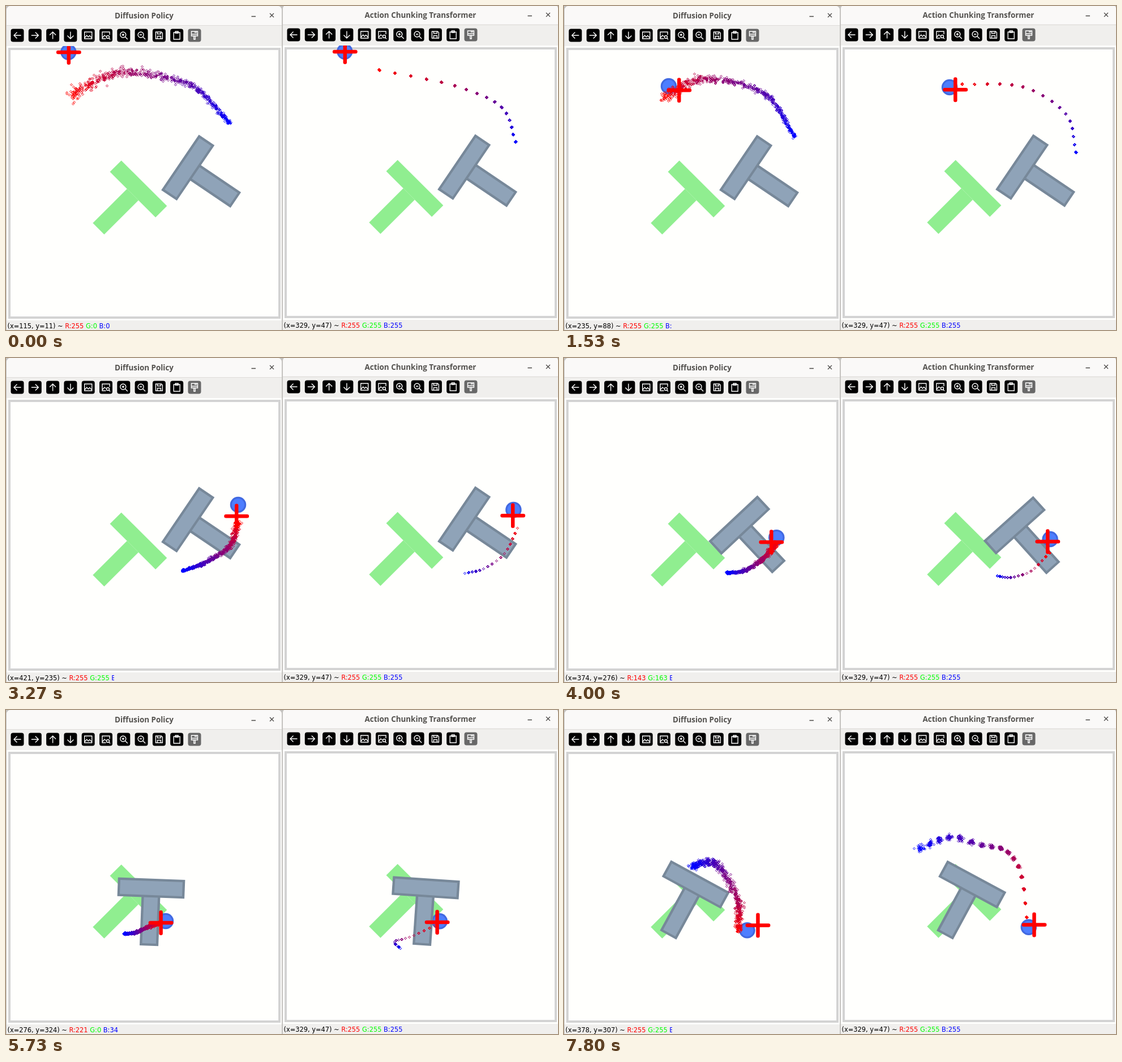
Animation of 975 by 574 pixels, one loop 8 s. Source, as an HTML page with a canvas:

```html
<!DOCTYPE html>
<html lang="en">
<head>
<meta charset="utf-8">
<title>Policy rollouts</title>
<style>
html, body { margin: 0; width: 100%; height: 100%; overflow: hidden; background: #fff; }
canvas { display: block; }
</style>
</head>
<body>
<canvas id="stage" width="975" height="574"></canvas>
<script>
const ctx = document.getElementById('stage').getContext('2d');
const LOOP = 8000, STEP_COUNT = 46, SAMPLES = 40, DOTS = 16;
const SCALE = 0.95, OX = 1, OY = 71;
const LEAD = 150, HOME_TIME = 6600;

// The picture is refreshed every 2.6 ticks of a 15 Hz clock, in whole ticks.
const stepTime = i => Math.round(Math.floor(2.6005 * i + 0.39) * 100 / 15) * 10;

// Cross: time, x, y. The pointer readout runs ahead of it, the agents trail it.
const PATH = [
  [150, 110.3, 81.6], [600, 122, 121], [1380, 185, 142], [1680, 224.3, 154.6], [2300, 318, 160],
  [2850, 414, 222], [3120, 410, 260], [3420, 401, 294.3], [4820, 315.5, 360.8], [5580, 282, 374],
  [5880, 263.2, 378.8], [6450, 227, 386], [6750, 222.4, 387.4], [7250, 275, 406], [7800, 342, 381],
  [7950, 360, 362.7]
];

// Points along each predicted curve, evenly spaced in plan time.
const PLANS = [
  { t: 0, left: [118, 155, 207, 117, 325, 140, 394, 206], right: [171, 114, 304, 142, 387, 180, 412, 241] },
  { t: 1530, left: [180, 160, 246, 129, 352, 154, 406, 229], right: [215, 139, 322, 144, 398, 192, 416, 260] },
  { t: 3270, left: [409, 292, 396, 331, 354, 361, 313, 376], right: [415, 302, 392, 347, 355, 374, 322, 382] },
  { t: 4670, left: [338, 350, 308, 368, 284, 386, 265, 384], right: [323, 373, 282, 398, 249, 399, 236, 391] },
  { t: 5730, left: [268, 378, 248, 385, 228, 394, 208, 396], right: [269, 383, 224, 403, 198, 411, 208, 423] },
  { t: 6600, left: [222, 390, 211, 397, 206, 402, 216, 420, 152, 461, 123, 404],
    right: [220, 389, 211, 394, 202, 401, 199, 460, 126, 452, 92, 386] },
  { t: 7800, left: [308, 388, 306, 335, 268, 272, 227, 276],
    right: [329, 368, 320, 296, 296, 252, 250, 240, 192, 226, 141, 245] }
];

// Block: time, x, y, degrees. Longer plans scatter more.
const REST = [3600, 309.7, 278.6, -55.9];
const WINDOWS = [
  { title: 'Diffusion Policy', plan: 'left', dx: 0, dy: 0, lag: 150, along: 0.35,
    spread: (length, u) => 0.5 + length / 75 * (1.3 - u),
    block: [REST, [4670, 284.3, 296.8, -22.8], [5730, 257, 301.5, 2.2], [6600, 240.1, 298.3, 26.8],
      [6900, 239.5, 296.8, 28.6]] },
  { title: 'Action Chunking Transformer', plan: 'right', dx: 488, dy: -1, lag: 75, along: 0,
    spread: length => length / 800,
    block: [REST, [4670, 280.2, 299.4, -20.1], [5730, 254.4, 302, 3.9], [6600, 239.8, 297.8, 28.4]] }
];

const WHITE = [255, 255, 255];

// What lies under the pointer: cross, floor, block, then the dots ahead of the cross.
function pointerColor(t) {
  if (t < 130) return [255, 0, 0];
  if (t < 3700 || t > 6900) return WHITE;
  if (t < 5200) return [143, 163, 184];
  return t < 6200 ? [221, 0, 34] : [238, 0, 1];
}

const ARROW = 'M6.5 0H-6M-.5-5.5L-6 0L-.5 5.5';
const PICTURE = 'M-6.5-6H6.5V6H-6.5ZM-6 4L-2.5 0L0 3L2.5 .5L6 4M-3-3.2h.6';
const LENS = 'M4 -1A5 5 0 1 1 -6 -1A5 5 0 1 1 4 -1M2.8 2.8L7 7M-3.2-1H1.2';
const ICONS = [
  [ARROW, 0], [ARROW, 180], [ARROW, 90], [ARROW, -90], [PICTURE, 0],
  ['M6.5-1V-6H-6.5V6H0M-6 4L-2.5 0L0 2M-3-3.2h.6M6 3A2.5 2.5 0 1 1 1 3A2.5 2.5 0 1 1 6 3M5.2 5L7.5 7.3', 0],
  [LENS + 'M-1-3.2V1.2', 0], [LENS, 0],
  ['M-6-6H4L6-4V6H-6ZM-3-6V-2.5H3V-6M-3 6V1.5H3V6', 0],
  ['M-5.5-5H5.5V7H-5.5ZM-2.5-7H2.5V-4H-2.5Z', 0],
  ['M-5.5-7H5.5V1H-5.5ZM-5.5-2H5.5M-1.2 1V7H1.2V1M1-7V-4M3.2-7V-4', 0]
].map(([d, turn]) => ({ path: new Path2D(d), turn: turn * Math.PI / 180 }));

const clamp = (v, lo, hi) => Math.min(hi, Math.max(lo, v));
const mix = (a, b, k) => a + (b - a) * k;
const mixAll = (a, b, k) => a.map((v, i) => mix(v, b[i], k));

// Cubic from a to b with slopes p and q per unit of k.
function hermite(a, b, p, q, k) {
  const s = k * k * (3 - 2 * k), r = 1 - k;
  return mix(a, b, s) + k * r * (p * r - q * k);
}

function segment(times, t) {
  let i = 0;
  while (i < times.length - 2 && t >= times[i + 1]) i++;
  return [i, clamp((t - times[i]) / (times[i + 1] - times[i]), 0, 1)];
}

// Smooth value of rows [time, ...values] at time t.
function at(keys, t) {
  const [i, k] = segment(keys.map(row => row[0]), t);
  const span = keys[i + 1][0] - keys[i][0];
  const slope = (j, c) => {
    const a = keys[Math.max(0, j - 1)], b = keys[Math.min(keys.length - 1, j + 1)];
    return (b[c] - a[c]) / (b[0] - a[0]) * span;
  };
  return keys[i].map((v, c) => hermite(v, keys[i + 1][c], slope(i, c), slope(i + 1, c), k)).slice(1);
}

// Point on a flat list of x, y pairs, u from 0 to 1.
function curvePoint(pts, u) {
  const n = pts.length / 2 - 1;
  const i = Math.min(n - 1, Math.floor(u * n));
  return [0, 1].map(axis => {
    const p = j => pts[2 * j + axis];
    const slope = j => j === 0 ? p(1) - p(0) : j === n ? p(n) - p(n - 1) : (p(j + 1) - p(j - 1)) / 2;
    return hermite(p(i), p(i + 1), slope(i), slope(i + 1), u * n - i);
  });
}

const chord = pts => Math.hypot(pts.at(-2) - pts[0], pts.at(-1) - pts[1]);

function makeGauss(seed) {
  const rand = () => {
    seed = (seed + 0x6D2B79F5) | 0;
    let x = Math.imul(seed ^ (seed >>> 15), 1 | seed);
    x = (x + Math.imul(x ^ (x >>> 7), 61 | x)) ^ x;
    return ((x ^ (x >>> 14)) >>> 0) / 4294967296;
  };
  return () => Math.sqrt(-2 * Math.log(1 - rand())) * Math.cos(2 * Math.PI * rand());
}

function rect(color, x, y, w, h) {
  ctx.fillStyle = color;
  ctx.fillRect(x, y, w, h);
}

function roundRect(color, x, y, w, h, r) {
  ctx.fillStyle = color;
  ctx.beginPath();
  ctx.roundRect(x, y, w, h, r);
  ctx.fill();
}

function disc(color, x, y, r) {
  ctx.fillStyle = color;
  ctx.beginPath();
  ctx.arc(x, y, r, 0, 7);
  ctx.fill();
}

function lines(color, width, ...pts) {
  ctx.strokeStyle = color;
  ctx.lineWidth = width;
  ctx.beginPath();
  for (let i = 0; i < pts.length; i += 4) {
    ctx.moveTo(pts[i], pts[i + 1]);
    ctx.lineTo(pts[i + 2], pts[i + 3]);
  }
  ctx.stroke();
}

function tee(x, y, deg, color, edge) {
  const bar = [-57, 0, 114, 28.5], stem = [-14.25, 28.5, 28.5, 85.5];
  ctx.save();
  ctx.translate(x, y);
  ctx.rotate(deg * Math.PI / 180);
  for (const [a, b, w, h] of [stem, bar]) {
    if (edge) {
      rect(edge, a - 2.3, b - 2.8, w + 4.6, h + 4.9);
      rect(color, a + 2, b + 1.5, w - 4, h - 3.5);
    } else rect(color, a, b, w, h);
  }
  ctx.restore();
}

function drawDots(win, t, seed) {
  const gauss = makeGauss(seed);
  const [s, k] = segment(PLANS.map(plan => plan.t), t);
  const [from, to] = [PLANS[s], PLANS[s + 1]];
  const [a, b] = [from[win.plan], to[win.plan]];
  const cross = at(PATH, t);
  const base = mixAll(at(PATH, from.t), at(PATH, to.t), k);
  const length = mix(chord(a), chord(b), k);
  const late = Math.max(0, t - HOME_TIME) / 1200;
  ctx.lineWidth = 1;
  for (let i = 0; i < DOTS; i++) {
    ctx.strokeStyle = `rgb(${255 - 17 * i},0,${17 * i})`;
    ctx.beginPath();
    for (let n = 0; n < SAMPLES; n++) {
      const u = clamp((i + win.along * gauss()) / (DOTS - 1), 0, 1);
      const spread = win.spread(length, u) + 2.8 * late * u;
      const p = mixAll(curvePoint(a, u), curvePoint(b, u), k);
      // The near end follows the cross, the far end keeps to the plan.
      const [x, y] = p.map((v, c) => Math.round(v + (cross[c] - base[c]) * (1 - u) + spread * gauss()) + 0.5);
      ctx.moveTo(x - 2, y);
      ctx.lineTo(x, y - 2);
      ctx.lineTo(x + 2, y);
      ctx.lineTo(x, y + 2);
      ctx.closePath();
    }
    ctx.stroke();
  }
}

function drawScene(win, t, seed) {
  ctx.save();
  ctx.beginPath();
  ctx.rect(OX, OY, 486, 486);
  ctx.clip();
  rect('#fffffd', OX, OY, 486, 486);
  ctx.strokeStyle = '#d3d3d3';
  ctx.lineWidth = 4;
  ctx.strokeRect(6, 76, 477, 476);
  tee(244, 314, 45, '#90ee90');
  const [ax, ay] = at(PATH, t - win.lag);
  disc('#4169e1', ax, ay, 14.25);
  disc('#4e7eff', ax, ay, 11);
  tee(...at(win.block, t), '#8fa3b8', '#778899');
  drawDots(win, t, seed);
  const [x, y] = at(PATH, t).map(v => v + 0.5);
  ctx.lineCap = 'round';
  lines('#f00', 6.5, x - 18.7, y, x + 18.7, y, x, y - 18.7, x, y + 18.7);
  ctx.restore();
}

function drawFrame(win) {
  roundRect('#f0efed', 1, win.dy, 486, 590, 7);
  roundRect('#faf9f8', 1, win.dy, 486, 34, [7, 7, 0, 0]);
  rect('#dedcd9', 1, 34, 486, 1);
  ctx.fillStyle = '#54524f';
  ctx.textAlign = 'center';
  ctx.font = 'bold 13.4px "Open Sans", sans-serif';
  ctx.fillText(win.title, 244, 22);
  ctx.textAlign = 'left';
  ctx.lineCap = 'butt';
  lines('#4a4846', 1.3, 433.5, 18.5, 441, 18.5, 466, 13, 473, 20, 466, 20, 473, 13);
  ICONS.forEach(({ path, turn }, i) => {
    ctx.save();
    ctx.translate(20 + 31.3 * i, 52);
    roundRect(i === 10 ? '#686868' : '#000', -11.5, -11.5, 23, 23, 4);
    ctx.rotate(turn);
    ctx.strokeStyle = '#fff';
    ctx.lineWidth = 1.4;
    ctx.stroke(path);
    ctx.restore();
  });
}

function drawStatus(mx, my, [r, g, b], limit) {
  ctx.save();
  ctx.beginPath();
  ctx.rect(0, 557, limit, 20);
  ctx.clip();
  ctx.font = '11.4px "DejaVu Sans", sans-serif';
  let x = 2.5;
  const parts = [['#000', `(x=${mx}, y=${my}) ~ `], ['#f00', `R:${r} `], ['#0f0', `G:${g} `], ['#00f', `B:${b}`]];
  for (const [color, text] of parts) {
    ctx.fillStyle = color;
    ctx.fillText(text, x, 571);
    x += ctx.measureText(text).width;
  }
  ctx.restore();
}

function draw(step) {
  const t = stepTime(step);
  rect('#c4c2bf', 0, 0, 975, 574);
  WINDOWS.forEach((win, side) => {
    ctx.save();
    ctx.translate(win.dx, win.dy);
    drawFrame(win);
    drawScene(win, t, step * 977 + side * 31 + 5);
    if (side) drawStatus(329, 47, WHITE, 480);
    else {
      const [px, py] = at(PATH, t + LEAD);
      const rgb = pointerColor(t);
      // Long readouts outgrow their label and are cut off.
      drawStatus(Math.round((px - OX) / SCALE), Math.round((py - OY) / SCALE), rgb, rgb[1] > 9 ? 191 : 300);
    }
    ctx.restore();
  });
}

let shown = -1;
function tick() {
  const t = performance.now() % LOOP;
  let step = STEP_COUNT - 1;
  while (stepTime(step) > t) step--;
  if (step !== shown) draw(shown = step);
  requestAnimationFrame(tick);
}
tick();
</script>
</body>
</html>
```
